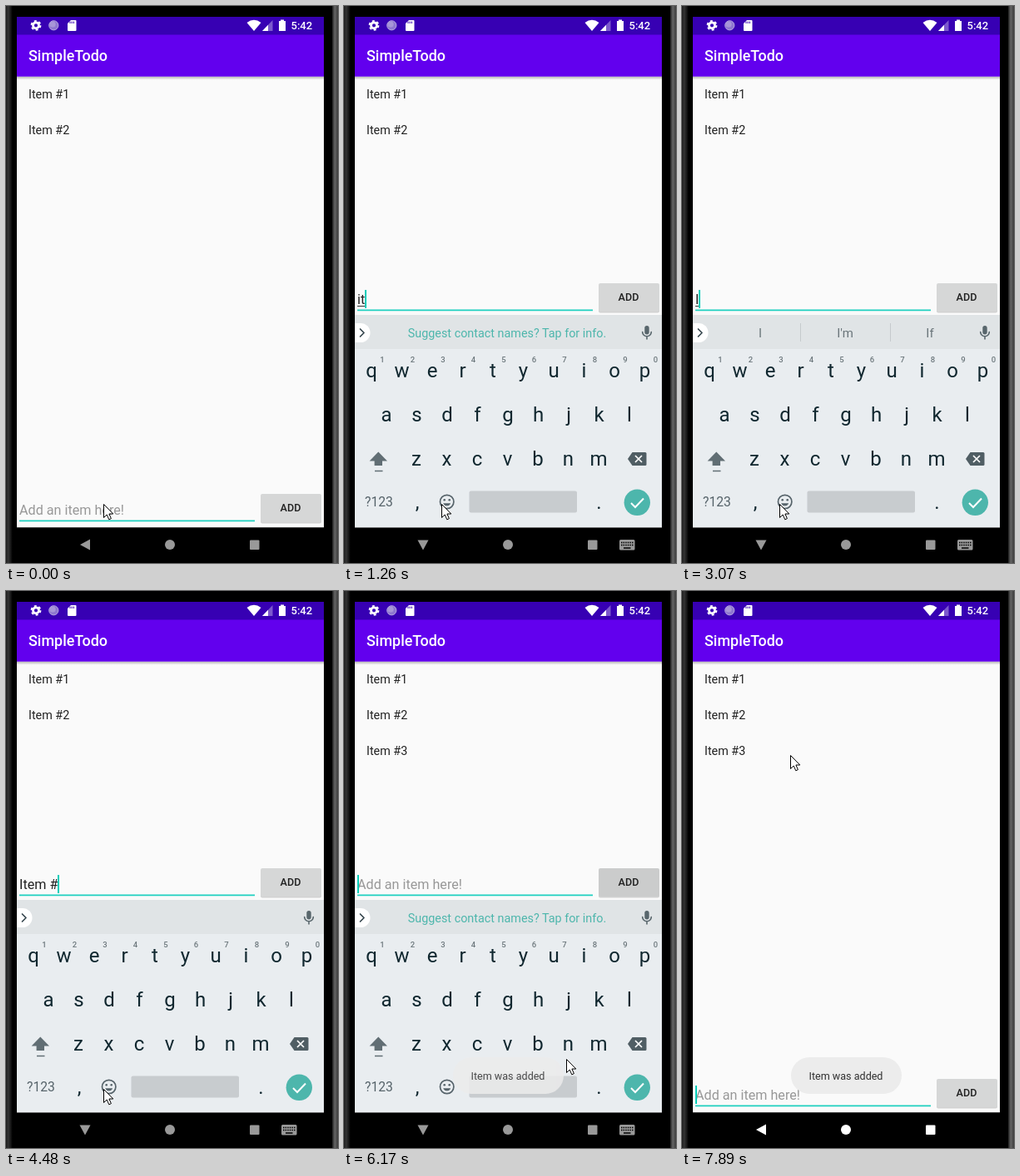
These frames come from a looping animation (399x669 px, 8 s). An HTML page:

```html
<!DOCTYPE html>
<html lang="en">
<head>
<meta charset="utf-8">
<title>Todo app</title>
<style>
html, body { margin: 0; width: 100%; height: 100%; overflow: hidden; background: #000; }
svg { display: block; width: 399px; height: 669px; font-family: Roboto, sans-serif; }
text { white-space: pre; }
.mid { text-anchor: middle; }
.item { font-size: 14.37px; fill: #212121; }
.key { font-size: 24px; fill: #10272f; }
.num { font-size: 9.5px; font-weight: 500; fill: #6c777c; }
.word { font-size: 15px; fill: #6a757a; }
.line { fill: none; stroke-linecap: round; stroke-linejoin: round; }
</style>
</head>
<body>
<svg viewBox="0 0 399 669">
  <defs>
    <linearGradient id="shade" x2="0" y2="1">
      <stop stop-opacity=".28"/><stop offset="1" stop-opacity="0"/>
    </linearGradient>
    <linearGradient id="edge">
      <stop stop-color="#1b1b1b"/><stop offset=".2" stop-color="#343434"/>
      <stop offset=".45" stop-color="#161616"/><stop offset=".6"/>
    </linearGradient>
    <linearGradient id="rim">
      <stop stop-color="#1c1c1c"/><stop offset=".45" stop-color="#666"/>
      <stop offset="1" stop-color="#3c3c3c"/>
    </linearGradient>
    <clipPath id="screen"><path d="M13 13H382V626.300H13z"/></clipPath>
  </defs>

  <!-- phone body -->
  <path d="M0 0H399V669H0z"/>
  <path d="M0 0H13V669H0z" fill="url(#edge)"/>
  <path d="M392 0h7V669h-7z" fill="url(#rim)"/>

  <!-- app -->
  <path d="M13 84H382V626.300H13z" fill="#fafafa"/>
  <path d="M13 84.700H382v4H13z" fill="url(#shade)"/>
  <path d="M13 34H382V84.700H13z" fill="#6200ee"/>
  <path d="M13 13H382V34.400H13z" fill="#3700b3"/>
  <text x="27" y="66" font-size="17.96" font-weight="500" fill="#fff">SimpleTodo</text>
  <text x="27" y="111" class="item">Item #1</text>
  <text x="27" y="154" class="item">Item #2</text>
  <text x="27" y="197" class="item" id="added">Item #3</text>

  <!-- status icons -->
  <g fill="none" stroke="#fff">
    <circle cx="36" cy="23.3" r="3.5" stroke-width="2.8"/>
    <circle cx="36" cy="23.3" r="5.4" stroke-width="2" stroke-dasharray="2.85 2.8"/>
  </g>
  <circle cx="57.3" cy="23.3" r="5.6" fill="#8e78cf" stroke="#b9a8e2"/>
  <circle cx="56" cy="22" r="3.6" fill="#a796d8"/>
  <g fill="#fff">
    <path d="M78 17h5.5q1 0 1 1V29q0 1-1 1H75q-1 0-1-1V21z"/>
    <path d="M289.5 20Q298 13.500 306.500 20L298 30z"/>
    <path d="M308 30L320.500 17V30z" opacity=".35"/>
    <path d="M308 30L315 22.700V30z"/>
    <path d="M330 16.500h4V18h2V30h-8V18h2z"/>
    <text x="342.500" y="28" font-size="13" font-weight="500">5:42</text>
  </g>
  <path d="M77 18.500v2.500m2.200-2.500v2.500m2.200-2.500v2.500" stroke="#3700b3"/>

  <!-- entry row -->
  <g id="row">
    <path d="M16 365.300H299" stroke="#1fd0c0" stroke-width="1.8"/>
    <text id="hint" x="16" y="358" font-size="16.17" fill="#989898">Add an item here!</text>
    <text id="typed" x="16" y="358" font-size="16.17" fill="#212121"></text>
    <path id="mark" stroke="#333"/>
    <path id="caret" stroke="#03cdb9" stroke-width="2"/>
    <rect x="306" y="334" width="73" height="34.500" rx="2" opacity=".16"/>
    <rect id="button" x="306" y="333" width="73" height="34" rx="2"/>
    <text x="342" y="354" class="mid" font-size="12.57" font-weight="500" fill="#212121">ADD</text>
  </g>

  <g clip-path="url(#screen)"><g id="board">
    <path d="M13 371H382V627H13z" fill="#e9edf0"/>
    <path d="M13 371H382V412H13z" fill="#e0e4e6"/>
    <path d="M13 381h7a11.500 11.500 0 0 1 0 23h-7z" fill="#fff"/>
    <path d="M19.500 388l4.500 4.500-4.500 4.500" class="line" stroke="#37474f" stroke-width="1.7"/>
    <rect x="361.300" y="384" width="5.400" height="10.500" rx="2.700" fill="#58666c"/>
    <path d="M358.700 391.500a5.300 5.300 0 0 0 10.600 0M364 397v3" class="line" stroke="#58666c" stroke-width="1.6"/>
    <text id="tip" x="196" y="398" class="mid" font-size="14.37" fill="#4db6ac">Suggest contact names? Tap for info.</text>
    <g id="words">
      <path d="M142.500 381v22M250.500 381v22" stroke="#c5cacd"/>
    </g>
    <g id="keys"></g>
    <path d="M41.300 535.500L52 546.500H46V552H36.600V546.500H30.600z" fill="#616e74"/>
    <path d="M37 558.500h9.500" stroke="#616e74" stroke-width="1.5"/>
    <path d="M341 544l5.500-8H362q1.500 0 1.500 1.500v13q0 1.500-1.500 1.500H346.500z" fill="#505e64"/>
    <path d="M350 540l8 8m0-8l-8 8" stroke="#fff" stroke-width="1.700"/>
    <text x="42" y="601" class="mid" font-size="15.700" fill="#56636a">?123</text>
    <g transform="translate(123.700 595.500)" fill="#56636a">
      <circle r="8.200" class="line" stroke="#56636a" stroke-width="1.700"/>
      <circle cx="-3" cy="-2.300" r="1.300"/>
      <circle cx="3" cy="-2.300" r="1.300"/>
      <path d="M-4.500 1.700H4.500A4.800 4.800 0 0 1-4.500 1.700z"/>
    </g>
    <rect x="150.500" y="582.500" width="129.500" height="26" rx="2" fill="#c8cccf"/>
    <circle cx="352.300" cy="596.300" r="15.700" fill="#4db6ac"/>
    <path d="M345 597l5 5 10-10.500" fill="none" stroke="#fff" stroke-width="2"/>
  </g></g>

  <g id="toast">
    <rect x="131" y="560" width="133" height="44" rx="22" fill="#ececec"/>
    <text x="197" y="587" class="mid" font-size="12.57" fill="#303030">Item was added</text>
  </g>

  <!-- navigation bar -->
  <rect id="press" x="56" y="626" width="78" height="43" rx="21.500" fill="#222"/>
  <g id="nav">
    <path id="down" d="M88.500 641.500H101.500L95 653.500z"/>
    <path id="back" d="M101 640.500V653.500L89 647z"/>
    <circle cx="197" cy="647" r="6"/>
    <rect x="293" y="641.500" width="11.500" height="11.500" rx="1"/>
    <g id="switch">
      <rect x="331" y="641" width="18.500" height="12.500" rx="1.500"/>
      <path d="M333 644.500h14.500M333 647.500h14.500" stroke="#000" stroke-width="1.500" stroke-dasharray="1.500 1.100"/>
      <path d="M336 651h8.500" stroke="#000" stroke-width="1.500"/>
    </g>
  </g>

  <path id="pointer" d="M.5.500V16.500L4.200 13 6.800 18.800 9.400 17.600 6.900 12H11.800z" fill="#fff" stroke="#000"/>
</svg>

<script>
const $ = id => document.getElementById(id);
const show = (id, on) => $(id).setAttribute('opacity', +on);

function addText(parent, x, y, cls, text = '') {
  const el = document.createElementNS('http://www.w3.org/2000/svg', 'text');
  el.setAttribute('x', x);
  el.setAttribute('y', y);
  el.setAttribute('class', cls + ' mid');
  el.textContent = text;
  return $(parent).appendChild(el);
}

const PITCH = 36.5;
[['qwertyuiop', 33, 446], ['asdfghjkl', 51, 499], ['zxcvbnm', 87, 552]].forEach(([row, x, y]) =>
  [...row].forEach((c, i) => addText('keys', x + i * PITCH, y, 'key', c)));
[...'1234567890'].forEach((c, i) => addText('keys', 46 + i * PITCH, 428, 'num', c));
addText('keys', 88, 604, 'key', ',');
addText('keys', 306.5, 604, 'key', '.');
const words = [94, 196, 298].map(x => addText('words', x, 398, 'word'));

const LOOP = 8000, TIP = 'tip';
const ITEMS = 'item items iteration', CAPS = 'Item Items Iteration';

// Each step changes only the named parts of the state and holds until the next.
const steps = [
  [0, { at: [117, 598], text: '', mark: 0, caret: 0, strip: TIP, up: 0, board: 0, ime: 0,
        added: 0, toast: 0, button: '#d6d7d7', press: 0, nav: '#999' }],
  [120, { board: .5, ime: 1 }],
  [260, { board: 1, up: 1 }],
  [400, { caret: 1 }],
  [830, { caret: 0 }],
  [1260, { text: 'it', mark: 1, caret: 1 }],
  [1400, { text: 'ite', strip: ITEMS }],
  [1530, { text: 'item' }],
  [2090, { caret: 0 }],
  [2360, { text: 'ite', caret: 1 }],
  [2500, { text: 'it', strip: "it it's item" }],
  [2650, { text: 'i', strip: "I I'm if" }],
  [2790, { text: '', strip: "I The I'm" }],
  [3070, { text: 'I', strip: "I I'm If" }],
  [3350, { text: 'It', strip: "It It's Item" }],
  [3490, { text: 'Ite', strip: CAPS }],
  [3630, { text: 'Item' }],
  [3930, { text: 'Item ', mark: 0, strip: 'is of and' }],
  [4340, { text: 'Item #' }],
  [4480, { strip: '' }],
  [4910, { text: 'Item #3' }],
  [5190, { at: [150, 560] }],
  [5330, { at: [235, 465] }],
  [5470, { at: [312, 375] }],
  [5610, { at: [335, 352] }],
  [5750, { button: '#c4c5c5' }],
  [5890, { text: '', strip: TIP, added: 1 }],
  [6030, { at: [318, 440], toast: .4 }],
  [6170, { at: [267, 562], toast: .85, button: '#cbcccc' }],
  [6290, { at: [252, 588], toast: 1, button: '#d6d7d7' }],
  [6420, { at: [205, 625], caret: 0 }],
  [6560, { at: [150, 645] }],
  [6690, { at: [115, 650] }],
  [6830, { at: [107, 650], caret: 1 }],
  [7100, { press: .6 }],
  [7230, { press: 1, up: 0, ime: 0 }],
  [7380, { press: .5, board: .5, caret: 0 }],
  [7510, { at: [110, 610], press: 0, board: 0, nav: '#fff' }],
  [7640, { at: [118, 470] }],
  [7760, { at: [126, 290] }],
  [7890, { at: [130, 197], caret: 1 }],
];

function draw(t) {
  const s = Object.assign({}, ...steps.filter(([start]) => start <= t).map(([, part]) => part));

  $('typed').textContent = s.text;
  const end = 16 + (s.text ? $('typed').getComputedTextLength() : 0);
  $('mark').setAttribute('d', `M16 360.5H${end}`);
  $('caret').setAttribute('d', `M${Math.round(end) + 1} 341V363`);
  show('hint', !s.text);
  show('mark', s.mark && s.text);
  show('caret', s.caret);
  $('row').setAttribute('transform', `translate(0 ${s.up ? 0 : 253})`);
  $('button').setAttribute('fill', s.button);

  const list = s.strip.split(' ');
  show('tip', s.strip === TIP);
  show('words', list.length === 3);
  words.forEach((w, i) => w.textContent = list[i] || '');

  show('board', s.board);
  $('board').setAttribute('transform', `translate(0 ${(1 - s.board) * 25})`);
  show('added', s.added);
  show('toast', s.toast);
  show('press', s.press);
  show('down', s.ime);
  show('back', !s.ime);
  show('switch', s.ime);
  $('nav').setAttribute('fill', s.nav);
  $('pointer').setAttribute('transform', `translate(${s.at})`);
}

const begin = performance.now();
function tick() {
  draw((performance.now() - begin) % LOOP);
  requestAnimationFrame(tick);
}
tick();
</script>
</body>
</html>
```
